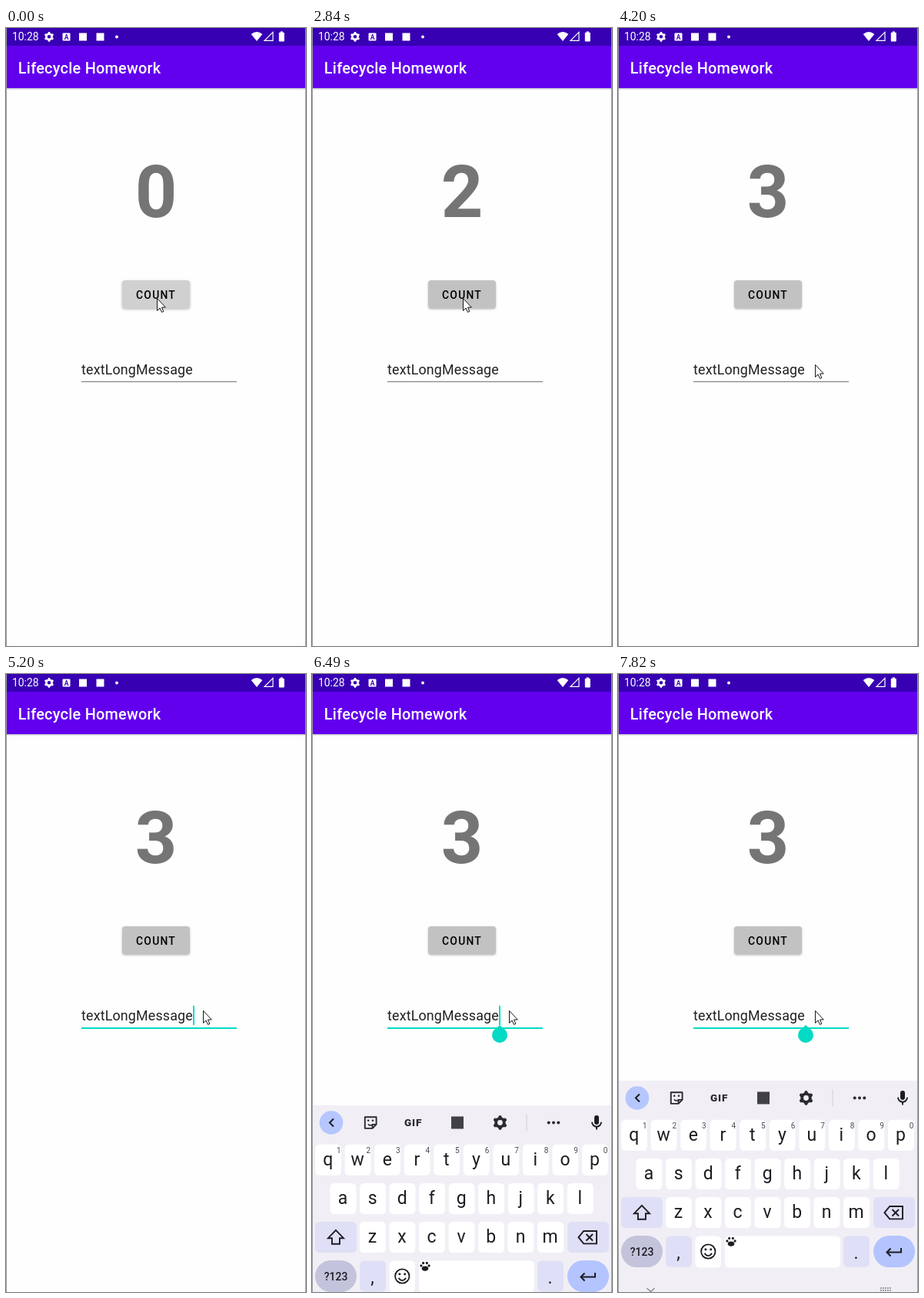
Write an HTML page with a canvas that moves like this. It is 390 px wide and 801 px high and loops after 8000 ms.

```html
<!DOCTYPE html>
<html lang="en">
<head>
<meta charset="utf-8">
<title>Counter app</title>
<style>
html, body { margin: 0; width: 100%; height: 100%; overflow: hidden; background: #fefefe; }
canvas { display: block; width: 390px; height: 801px; }
</style>
</head>
<body>
<canvas id="stage"></canvas>
<script>
const W = 390, H = 801, LOOP = 8000, PITCH = 38.53;
const TAPS = [1510, 2200, 3270];
const MOVE = 3540, FOCUS = 4570, TYPE = 5200, HANDLE = 5590, KEYS = 6490, DOCKED = 6610;
const TEAL = '#03dac5', INK = '#1d1c22', ICON = '#2b2a30', PANEL = '#f1eff5', SIDE = '#dfe0f7';

const canvas = document.getElementById('stage');
const dpr = window.devicePixelRatio || 1;
canvas.width = W * dpr;
canvas.height = H * dpr;
const c = canvas.getContext('2d');

const clamp = v => Math.max(0, Math.min(1, v));
const smooth = v => clamp(v) ** 2 * (3 - 2 * clamp(v));
const held = (t, from, step) => from + Math.floor((t - from) / step) * step;
const taps = t => TAPS.filter(start => t >= start).length;

function rect(x, y, w, h, color) {
  c.fillStyle = color;
  c.fillRect(x, y, w, h);
}

function round(x, y, w, h, r, color) {
  c.fillStyle = color;
  c.beginPath();
  c.roundRect(x, y, w, h, r);
  c.fill();
}

function disc(x, y, r, color) {
  c.fillStyle = color;
  c.beginPath();
  c.arc(x, y, r, 0, 7);
  c.fill();
}

function ring(x, y, r, from = 0, to = Math.PI * 2) {
  c.beginPath();
  c.arc(x, y, r, from, to);
  c.stroke();
}

function path(points, close) {
  c.beginPath();
  points.forEach(([x, y]) => c.lineTo(x, y));
  if (close) c.closePath();
}

function pen(color, width, join = 'miter') {
  c.strokeStyle = color;
  c.lineWidth = width;
  c.lineJoin = join;
}

function line(points, close) {
  path(points, close);
  c.stroke();
}

function text(s, x, y, size, color, { weight = 400, align = 'left', spacing = 0 } = {}) {
  c.font = `${weight} ${size}px Roboto, sans-serif`;
  c.textAlign = align;
  c.letterSpacing = spacing + 'px';
  c.fillStyle = color;
  c.fillText(s, x, y);
}

function gear(x, y, r, color) {
  c.fillStyle = color;
  c.beginPath();
  for (let i = 0; i < 24; i++) {
    const a = (i - 1.5) * Math.PI / 12 + Math.PI / 2;
    const k = i % 4 === 1 || i % 4 === 2 ? r : r * 0.76;
    c.lineTo(x + Math.cos(a) * k, y + Math.sin(a) * k);
  }
  c.closePath();
  c.moveTo(x + r * 0.36, y);
  c.arc(x, y, r * 0.36, 0, Math.PI * 2);
  c.fill('evenodd');
}

function statusBar() {
  rect(0, 0, W, 23, '#3700b3');
  text('10:28', 8, 16.3, 13.9, '#fff');
  gear(56, 11.3, 6.4, '#fff');
  round(73.5, 6.5, 10, 10, 1, '#fff');
  text('A', 78.5, 14.6, 8.5, '#3700b3', { weight: 700, align: 'center' });
  rect(95, 6.5, 10, 10, '#fff');
  rect(117.5, 6.5, 10, 10, '#fff');
  disc(144, 11.5, 1.9, '#fff');
  c.beginPath();
  c.moveTo(326, 17);
  c.lineTo(318.7, 8);
  c.quadraticCurveTo(326, 2, 333.3, 8);
  c.fill();
  pen('#fff', 1.2);
  line([[336, 16.4], [347, 16.4], [347, 5.4]], true);
  round(354.8, 5.7, 7, 11.8, 1, '#fff');
  rect(356.8, 4.4, 3, 2, '#fff');
}

function appBar() {
  const fade = c.createLinearGradient(0, 78, 0, 81);
  fade.addColorStop(0, 'rgba(0,0,0,.2)');
  fade.addColorStop(1, 'rgba(0,0,0,0)');
  rect(0, 78, W, 3, fade);
  rect(0, 23, W, 55, '#6200ee');
  text('Lifecycle Homework', 15.8, 58.6, 19.86, '#fff', { weight: 500, spacing: 0.25 });
}

// The button darkens with the first two taps
function button(t) {
  const shade = 208 - 7 * Math.min(taps(t), 2);
  c.save();
  c.shadowColor = 'rgba(0,0,0,.27)';
  c.shadowBlur = (t < 500 ? 3.5 : 2.5) * dpr;
  c.shadowOffsetY = 1.5 * dpr;
  round(151, 327, 88, 36, 4, `rgb(${shade},${shade},${shade})`);
  c.restore();
  text('COUNT', 169, 350.7, 13.9, '#000', { weight: 500, spacing: 1.24 });
}

function field(t) {
  const focused = t >= FOCUS;
  text('textLongMessage', 98, 449.4, 17.87, '#212121', { spacing: 0.168 });
  rect(98, 458, 202, focused ? 2 : 1, focused ? TEAL : '#757575');
  const blink = (t - 5140) % 960 < 500;
  if (focused && (t < TYPE || blink)) rect(t < TYPE ? 98 : 243, 430, 2, 25, TEAL);
  if (t >= HANDLE) {
    disc(244, 468, 10, TEAL);
    path([[244, 455], [251.5, 462], [236.5, 462]], true);
    c.fill();
  }
}

function key(x, y, w, label, fill = '#fff', drop = 27) {
  round(x, y, w, 40, 5.5, fill);
  text(label, x + w / 2 - 0.4, y + drop, 23, INK, { align: 'center' });
}

function letters(row, x, y) {
  [...row].forEach((ch, i) => key(x + i * PITCH, y, 33.8, ch));
}

function toolbar(y) {
  disc(25, y, 15.3, '#b6c6ff');
  pen(INK, 2);
  line([[28, y - 5], [23, y], [28, y + 5]]);

  // Sticker
  pen(ICON, 1.9, 'round');
  line([[68.8, y - 7.3], [83.6, y - 7.3], [83.6, y + 2.4], [78.6, y + 7.4], [68.8, y + 7.4]], true);
  line([[83.4, y + 2.4], [78.6, y + 2.4], [78.6, y + 7.2]]);
  disc(73.2, y - 2.7, 1.3, ICON);
  disc(79, y - 2.7, 1.3, ICON);
  c.lineWidth = 1.6;
  ring(76, y, 3.5, 0.5, 2.6);

  text('GIF', 131.6, y + 4.5, 13.5, ICON, { weight: 900, align: 'center', spacing: 0.8 });
  rect(181, y - 8, 16, 16, '#414047');
  gear(244.5, y, 9.4, ICON);
  rect(278.5, y - 11, 1, 22, '#cfcdd5');
  for (let i = -1; i <= 1; i++) disc(314 + i * 6.3, y, 2, ICON);

  // Microphone
  round(367, y - 9.5, 6, 12, 3, INK);
  pen(INK, 1.9);
  ring(370, y - 0.7, 6, 0, Math.PI);
  line([[370, y + 5], [370, y + 9]]);
}

function paw(x, y) {
  for (let i = 0; i < 4; i++) {
    const a = Math.PI * (1.04 + i * 0.307);
    disc(x + 5.1 * Math.cos(a), y + 4.6 * Math.sin(a), 1.6, INK);
  }
  c.beginPath();
  c.ellipse(x, y + 3.1, 4.3, 3.1, 0, 0, 7);
  c.fill();
}

function keyboard(t) {
  c.save();
  c.translate(0, t < DOCKED ? 32 : 0);
  rect(0, 527, W, 310, PANEL);
  toolbar(549.5);

  letters('qwertyuiop', 4.2, 577.8);
  [...'1234567890'].forEach((n, i) =>
    text(n, 34.8 + i * PITCH, 589, 10, '#4a4950', { align: 'center' }));
  letters('asdfghjkl', 23.6, 628);
  letters('zxcvbnm', 62, 678);

  // Shift and backspace
  round(4, 678, 54, 40, 5.5, SIDE);
  round(332, 678, 54, 40, 5.5, SIDE);
  pen(INK, 1.9);
  line([[31, 688.8], [41, 699.2], [36, 699.2], [36, 706.7], [26, 706.7], [26, 699.2], [21, 699.2]], true);
  line([[346.5, 698.2], [353.2, 690], [370, 690], [370, 706.4], [353.2, 706.4]], true);
  line([[356.5, 694], [365, 702.5]]);
  line([[365, 694], [356.5, 702.5]]);

  // Bottom row
  round(4, 728, 54, 41, 20.5, '#c3c3dc');
  text('?123', 31, 754, 14, INK, { align: 'center', weight: 500 });
  key(62, 728.5, 34, ',', SIDE, 29.5);
  round(100.5, 728.5, 33.5, 41, 5.5, '#fff');
  pen(INK, 1.8);
  ring(117.3, 748.5, 9.2);
  disc(113.9, 745.8, 1.5, INK);
  disc(120.7, 745.8, 1.5, INK);
  ring(117.3, 749, 4.9, 0.35, 2.8);
  round(139, 728.5, 150, 41, 5.5, '#fff');
  paw(147, 735.5);
  key(293, 728.5, 34, '.', SIDE, 29.5);
  round(332, 728, 54, 41, 20.5, '#b4c4ff');
  pen(INK, 2);
  line([[368, 744], [368, 749.5], [350, 749.5]]);
  line([[354.5, 744.5], [349.5, 749.5], [354.5, 754.5]]);
  c.restore();

  // Navigation marks fade in by steps
  c.globalAlpha = clamp((held(t, DOCKED, 240) - DOCKED) / 2400);
  pen(ICON, 1.5);
  line([[37.5, 796], [42.5, 800.5], [47.5, 796]]);
  for (let i = 0; i < 15; i++) {
    rect(341 + (i % 5) * 3, 795 + Math.floor(i / 5) * 3, 1.8, 1.8, ICON);
  }
  c.globalAlpha = 1;
}

// Eases from the button to the field, dipping below it on the way
function pointer(t) {
  const s = held(t, MOVE, 150) - MOVE;
  const p = smooth((s + 56) / 249);
  const dip = 19 * Math.sin(Math.PI * clamp(s / 600));
  c.save();
  c.translate(Math.round(196 + 60 * p), Math.round(350 + 86 * p + dip));
  path([[0.5, 0.5], [0.5, 16.4], [4.1, 13], [6.5, 18.4], [8.8, 17.4], [6.5, 12.1], [11.3, 12]], true);
  c.fillStyle = '#fff';
  c.fill();
  pen('#16161c', 1);
  c.stroke();
  c.restore();
}

function draw(t) {
  c.setTransform(dpr, 0, 0, dpr, 0, 0);
  rect(0, 0, W, H, '#fefefe');
  appBar();
  statusBar();
  text(String(taps(t)), 195, 245, 95.3, '#757575', { weight: 700, align: 'center' });
  button(t);
  field(t);
  if (t >= KEYS) keyboard(t);
  rect(0, 0, 1, H, '#999');
  rect(W - 1, 0, 1, H, '#999');
  pointer(t);
}

const start = performance.now();
function tick() {
  draw((performance.now() - start) % LOOP);
  requestAnimationFrame(tick);
}
tick();
</script>
</body>
</html>
```
